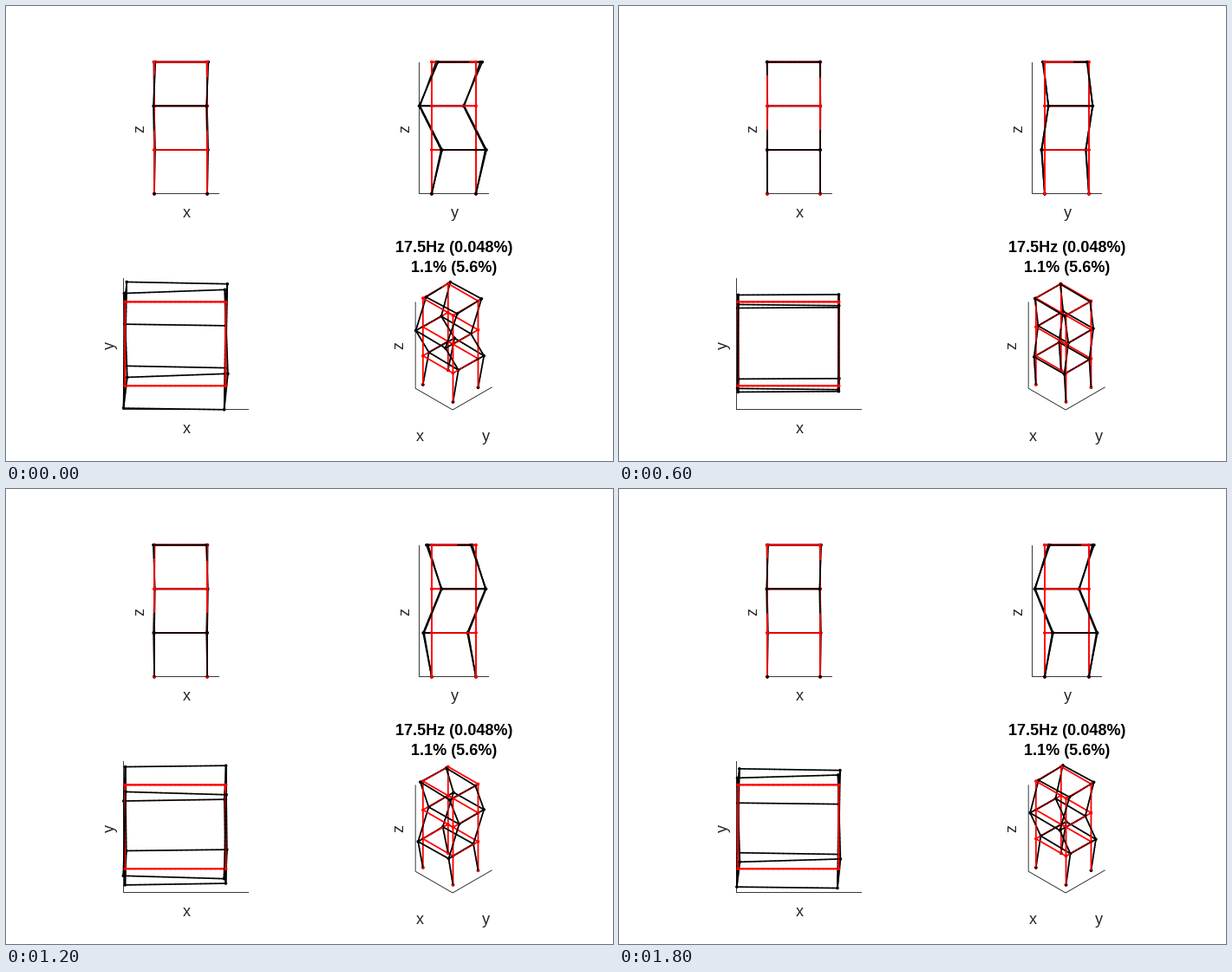
A matplotlib script that plays this animation: 700 px wide and 525 px high, repeating every 2000 ms.

```python
import numpy as np
import matplotlib.pyplot as plt
from matplotlib.animation import FuncAnimation
from matplotlib.collections import PolyCollection

W, H, DPI = 700, 525, 100
FRAMES, INTERVAL = 10, 200
RED, BLACK, GREY = "#ff0000", "#000000", "#262626"
LINE, DOT = 1.67, 1.8         # line width and node radius in pixels
PIECES = 20                   # pieces per bar, for depth sorting

# Frame size and mode shape (x shift, y shift, twist) per floor
WX, WY, FLOOR = 61.1, 51.0, 50.7
MODE = [(0, 0, 0), (0.5, 11.5, -1.2 / WX), (-0.55, -14.0, -0.9 / WX), (0.4, 6.3, 2.2 / WX)]
X_LIM, Y_LIM, Z_TOP = (-0.9, 74.7), (-14.3, 65.1), 151.5

S = 0.803
C, D, U = S / np.sqrt(2), S / np.sqrt(6), S * np.sqrt(2 / 3)

# Each view: pixel origin, pixel step per unit of x, y, z, and direction to the camera
VIEWS = {
    "xz": ((171.0, 216.7), [(1, 0), (0, 0), (0, -1)], (0, -1, 0)),
    "yz": ((490.9, 216.7), [(0, 0), (1, 0), (0, -1)], (1, 0, 0)),
    "xy": ((137.3, 438.3), [(1.9, 0), (0, -1.9), (0, 0)], (0, 0, 1)),
    "iso": ((480.8, 436.8), [(C, D), (C, -D), (0, -U)], (0.577, -0.577, 0.577)),
}


def project(view, pts):
    origin, steps, _ = VIEWS[view]
    return np.asarray(pts, float) @ np.array(steps, float) + origin


def nodes(phase):
    """Corner positions, indexed by floor and corner."""
    corners = np.array([(0, 0), (WX, 0), (WX, WY), (0, WY)])
    out = np.zeros((4, 4, 3))
    for k, (dx, dy, twist) in enumerate(MODE):
        for c, (x, y) in enumerate(corners):
            out[k, c] = (x + phase * (dx - twist * (y - WY / 2)),
                         y + phase * (dy + twist * (x - WX / 2)),
                         k * FLOOR)
    return out


def bars(p):
    columns = [(p[k, c], p[k + 1, c]) for k in range(3) for c in range(4)]
    beams = [(p[k, c], p[k, (c + 1) % 4]) for k in range(1, 4) for c in range(4)]
    return np.array(columns + beams)


ANGLES = np.linspace(0, 2 * np.pi, 16, endpoint=False)
DISC = DOT * np.column_stack([np.cos(ANGLES), np.sin(ANGLES)])


def shapes(view, p, color, bias):
    """Depth, polygon and colour for every bar piece and node."""
    toward = np.array(VIEWS[view][2])
    items = []
    for a, b in bars(p):
        a2, b2 = project(view, [a, b])
        length = np.hypot(*(b2 - a2))
        if length < 0.3:
            continue
        along = (b2 - a2) / length
        side = np.array([-along[1], along[0]]) * LINE / 2
        for i in range(PIECES):
            t0, t1 = i / PIECES, (i + 1) / PIECES
            q0 = a2 + (b2 - a2) * t0 - along * 0.35 * (i > 0)
            q1 = a2 + (b2 - a2) * t1 + along * 0.35 * (i < PIECES - 1)
            depth = (a + (b - a) * (t0 + t1) / 2) @ toward + bias
            items.append((depth, [q0 + side, q1 + side, q1 - side, q0 - side], color))
    for node in p.reshape(-1, 3):
        items.append((node @ toward + bias + 0.03, project(view, node) + DISC, color))
    return items


fig = plt.figure(figsize=(W / DPI, H / DPI), dpi=DPI, facecolor="white")
ax = fig.add_axes([0, 0, 1, 1])
ax.set_xlim(0, W)
ax.set_ylim(H, 0)
ax.axis("off")


def rule(view, *pts):
    xy = project(view, pts)
    if view != "iso":
        xy = np.floor(xy) + 0.5   # crisp one-pixel axes
    ax.plot(xy[:, 0], xy[:, 1], color=GREY, lw=0.65, zorder=1, snap=False)


def label(x, y, text, turn=0, color=GREY, weight="normal"):
    ax.text(x, y, text, rotation=turn, rotation_mode="anchor", ha="center", va="baseline",
            family="Liberation Sans", size=18 * 72 / DPI, color=color, weight=weight)


(x0, x1), (y0, y1) = X_LIM, Y_LIM
rule("xz", (x0, 0, Z_TOP), (x0, 0, 0), (x1, 0, 0))
rule("yz", (0, y0, Z_TOP), (0, y0, 0), (0, y1, 0))
rule("xy", (x0, y1, 0), (x0, y0, 0), (x1, y0, 0))
rule("iso", (x0, y0, Z_TOP), (x0, y0, 0), (x1, y0, 0), (x1, y1, 0))

label(208.5, 244, "x")
label(159, 141.5, "z", 90)
label(517.5, 244, "y")
label(465, 141.5, "z", 90)
label(208.5, 493, "x")
label(125, 391, "y", 90)
label(477.5, 502, "x")
label(553.5, 502, "y")
label(458, 391.5, "z", 90)
label(516.5, 284, "17.5Hz (0.048%)", color=BLACK, weight="bold")
label(516.5, 307, "1.1% (5.6%)", color=BLACK, weight="bold")

frame_art = PolyCollection([], edgecolors="none", linewidths=0, zorder=3, snap=False)
ax.add_collection(frame_art, autolim=False)
REST = nodes(0)


def draw(i):
    phase = np.cos(2 * np.pi * i / FRAMES)
    moved = nodes(phase)
    polys, colors = [], []
    for view in VIEWS:
        # small bias settles which structure wins where both coincide
        bias = 0.01 * (phase - 0.5 if view == "xy" else -phase)
        items = shapes(view, moved, BLACK, 0) + shapes(view, REST, RED, bias)
        items.sort(key=lambda item: item[0])
        polys += [item[1] for item in items]
        colors += [item[2] for item in items]
    frame_art.set_verts(polys)
    frame_art.set_facecolor(colors)
    return [frame_art]


anim = FuncAnimation(fig, draw, frames=FRAMES, interval=INTERVAL, repeat=True, repeat_delay=0)
plt.show()
```
